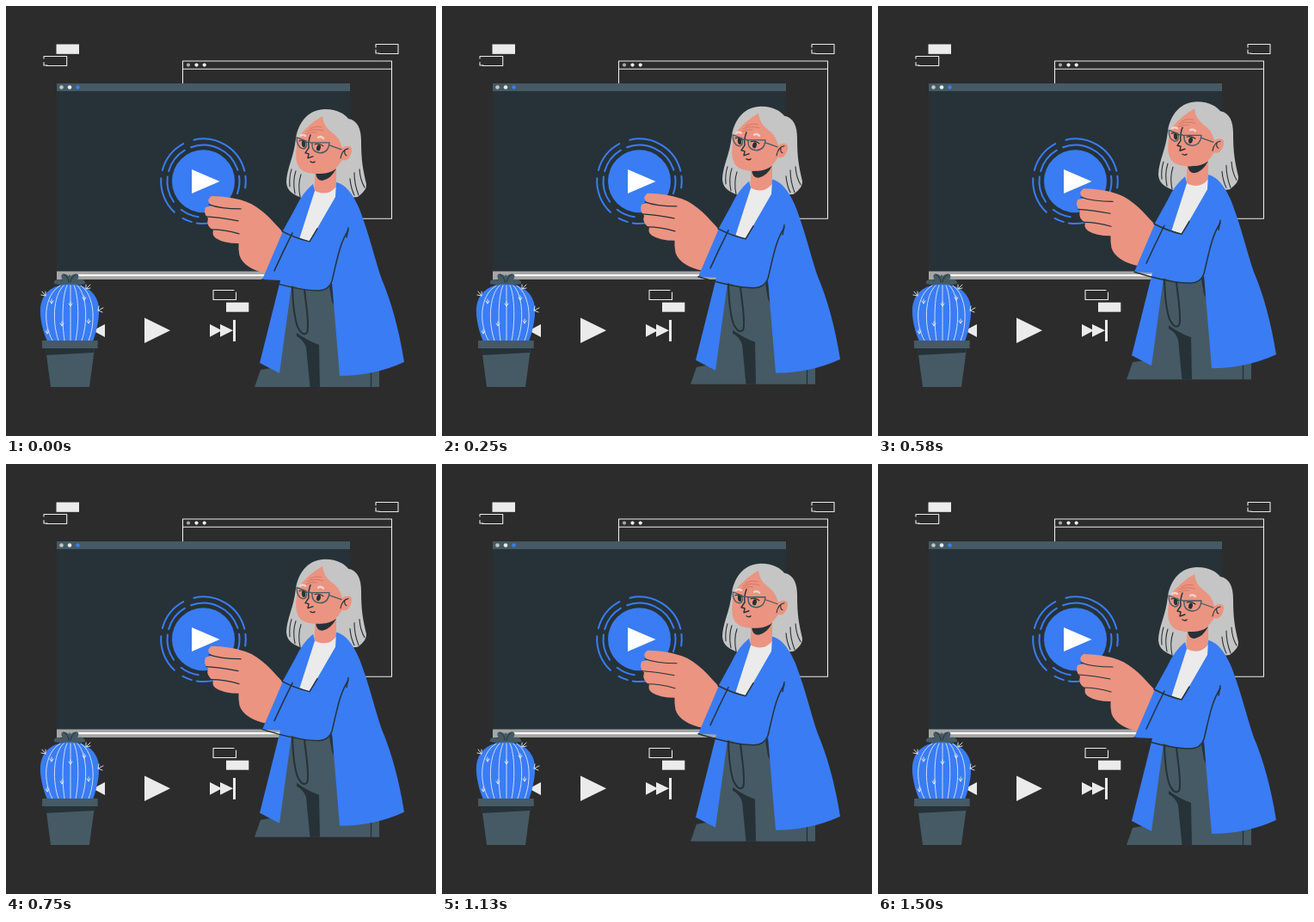
An HTML page with a canvas for the animation above (1540 ms loop, 500x500 px).

```html
<!DOCTYPE html>
<html lang="en">
<head>
<meta charset="utf-8">
<title>Video lesson</title>
<style>
  html, body { margin: 0; width: 100%; height: 100%; overflow: hidden; background: #2c2c2c; }
  canvas { display: block; width: 100vw; height: 100vh; }
</style>
</head>
<body>
<canvas id="stage" width="500" height="500"></canvas>
<script>
const ctx = document.getElementById('stage').getContext('2d');

const BG = '#2c2c2c', INK = '#263238', SLATE = '#455a64', BLUE = '#3a7cf3';
const SKIN = '#eb9481', HAIR = '#c5c5c5', WHITE = '#ebebeb', GRAY = '#a6a6a6';

const LOOP = 1540, STEPS = 37, PEAK = 17.2, RISE = 9.4;

function fill(color, path) {
  ctx.fillStyle = color;
  ctx.fill(new Path2D(path));
}

function line(color, width, path) {
  ctx.strokeStyle = color;
  ctx.lineWidth = width;
  ctx.stroke(new Path2D(path));
}

function rect(color, x, y, w, h) {
  ctx.fillStyle = color;
  ctx.fillRect(x, y, w, h);
}

function oval(color, x, y, rx, ry = rx, turn = 0) {
  ctx.fillStyle = color;
  ctx.beginPath();
  ctx.ellipse(x, y, rx, ry, turn, 0, Math.PI * 2);
  ctx.fill();
}

function arcs(x, y, r, spans) {
  ctx.strokeStyle = BLUE;
  ctx.lineWidth = 2;
  for (const [from, to] of spans) {
    ctx.beginPath();
    ctx.arc(x, y, r, from * Math.PI / 180, to * Math.PI / 180);
    ctx.stroke();
  }
}

function dots(y, r, list) {
  for (const [x, color] of list) oval(color, x, y, r);
}

function drawWindows() {
  rect(WHITE, 58.5, 44.5, 26.5, 11.3);
  line(WHITE, 1.1, 'M44 61V58.5H70.7V69.5H47M44 65.5V69H48');
  line(WHITE, 1.1, 'M430 48V44.5H456V55.5H434M430 51V55H434');

  line(WHITE, 1.1, 'M205.5 64H448.5V247.3H205.5ZM205.5 73.2H448.5');
  dots(68.6, 2.1, [[212, GRAY], [221.5, WHITE], [230.7, WHITE]]);

  rect(INK, 59, 90, 341, 228);
  rect(SLATE, 59, 90, 341, 9);
  dots(94.5, 2.3, [[64.5, '#c4c4c4'], [74, WHITE], [83.5, BLUE]]);
  rect(GRAY, 59, 308.5, 341, 9.5);
  rect('#fafafa', 84, 312, 316, 2.2);
}

function drawControls() {
  oval(BLUE, 229.5, 203.7, 36.5);
  arcs(229.5, 203.7, 42, [[-110, -18], [-8, 20], [145, 187], [196, 239], [98, 128]]);
  arcs(229.5, 203.7, 49.3, [[-103, -14], [-7, 9], [133, 184], [195, 242], [106, 119], [74, 99]]);
  fill('#fff', 'M216 190L248.5 204L216 218Z');

  fill(WHITE, 'M115 370V385L101 377.5Z');
  fill(WHITE, 'M161 362.5L191 377.3L161 392Z');
  fill(WHITE, 'M237 370L251 377.3L237 384.7ZM249 370L264 377.3L249 384.7Z');
  rect(WHITE, 264, 365, 3, 25);

  line(WHITE, 1.1, 'M267.5 333V341.5H241V330.5H265');
  rect(WHITE, 256, 344.7, 26.3, 11);
}

function drawCactus() {
  fill(SLATE, 'M56 323C55 318 60 317 66 319C62 312 66 309 73 314Q74 310 75 314C82 309 87 312 83 318C88 317 93 319 92 323Q74 327 56 323Z');
  line(INK, 1, 'M67 312Q73 315 73 321M81 312Q76 315 75 321');
  fill(BLUE, 'M48 390C41 374 38 355 41 345C45 331 57 323.5 74 323.5C91 323.5 103 331 107 345C110 355 107 374 101 390Z');

  for (const [x, mid, low] of [[63, 43, 54], [67, 54, 61], [71, 65, 68], [75, 75, 75], [79, 85, 81], [83, 95, 88], [87, 104, 96]])
    line('#dce9fb', .9, `M${x} 325C${mid} 337 ${mid} 370 ${low} 389`);
  for (const [x, y] of [[53, 345], [65, 371], [75, 348], [91, 341], [96, 368], [48, 380]])
    line(WHITE, .9, `M${x - 2} ${y - 2}L${x} ${y + 1}L${x + 2} ${y - 2}M${x} ${y - 4}V${y + 1}`);
  line(WHITE, .9, 'M42 332L46 337M41 336L46 337V332M98 324L93 329M93 324V329L98 328M113 351L107 354M108 349L107 354L112 356');

  rect(SLATE, 42, 389, 64.7, 9);
  fill(SLATE, 'M46 398H103L97 443H52Z');
  fill(INK, 'M46 398H103L102.3 403L47 406Z');
}

function drawLegs() {
  fill(SLATE, 'M329 315H386L392 420H434V443H289L296 423L316 420Z');
  fill(INK, 'M338 380Q350 389 364 394L365 443H353.5L349 397Q346 388 338 384Z');
  fill(INK, 'M376 326L382 318L385 385Q384 350 379 344Z');
  line(INK, 2, 'M333 327Q334 359 339 373Q345 385 350 380Q352 375 350 355L347 330');
  line(INK, 1.3, 'M424.5 424V443');
}

function drawHair() {
  fill(HAIR, 'M371 120C386 120 394 126 398 131C409 133 413 143 413 157C413 180 415 190 419 207Q420 214 409 222L390 224H346C334 219 327 216 326 205C326 190 335 175 337 154C340 134 353 120 371 120Z');
  line(INK, 1.1, 'M337 192Q333 204 336 218M343 196Q339 208 342 222M332 190Q329 199 330 210M405 194Q405 207 410 220M411 190Q412 203 417 211M400 201Q401 212 405 220');
}

function drawHead() {
  fill(SKIN, 'M360 188H384V214Q374 222 358 218Z');
  fill(INK, 'M360 194Q374 197 384 189Q378 201 368 203Q361 203 360 194Z');
  fill(SKIN, 'M368 128C358 134 343 145 339 156C336 174 336 186 346 192C359 198 377 195 386 186L391 179C397 182 402 174 402 167C402 162 396 162 391 165Q388 153 379 147Q369 140 368 128Z');
  line(INK, 1.1, 'M398 166Q391 167 389 177M394 168Q393 173 396 174');
  line('#cf705f', .8, 'M350 146Q358 142 369 145M353 143Q360 139 367 141M349 149Q355 146 361 147');

  line('#f1d3ca', 2.4, 'M342 151Q345 149 348 151M363 153Q366 151 369 154');
  oval(INK, 346, 160.5, 2.1, 3.8, -.15);
  oval(INK, 363.5, 165, 2.4, 3.6, .2);
  line(INK, 1.1, 'M341 157Q345 155 349 159M359 161Q364 159 369 163');
  line(INK, 1.4, 'M354 150Q351 158 352 165L348 171L352 172L351 177L357 175M354 181Q357 183 359 181');
  line(SLATE, 1.3, 'M338 153L349 157Q351 166 345 166Q338 164 338 153ZM356 159L376 159Q375 171 365 171Q355 170 356 159ZM349 159Q353 157 356 160M376 162L390 167');
}

function drawCoat() {
  fill(WHITE, 'M357 214Q374 223 384 210L386 224L354 278L337 272Z');
  fill(BLUE, 'M357 207Q344 218 337 234L321 263L341 271L359 215Z');
  fill(BLUE, 'M384 205C396 207 408 224 416 250C425 276 430 298 437 318Q454 358 463 414Q428 430 388 430L379 322Q374 332 363 331Q347 331 332 325L318 427L295 415L319 319L298 318L322 262L353 274L383 222Z');
  line(INK, 1.5, 'M298 318Q340 331 363 331Q375 331 379 320C385 295 388 276 398 261');
  line(INK, 1.5, 'M321 262Q336 270 353 274L362 259M333 264Q322 286 312 308M396 269L398 258');
}

function drawHand() {
  fill(SKIN, 'M239 221Q261 221 279 227.5C297 234 310 250 322 263L303 311C288 308 275 301 271.5 290Q270 282 270.5 276Q253 276 244 270Q239 266 241 261Q232 255 235 247Q229 241 232 234L240 232Q231 227 239 221Z');
  line(INK, 1.2, 'M236 231Q249 236 273 236M233 245Q250 246 270 250M239 260Q254 260 271 265');
}

// Smooth rise and fall, held on evenly spaced steps.
function lift(time) {
  const step = Math.floor((time % LOOP) * STEPS / LOOP + .2);
  return RISE * (1 + Math.cos(2 * Math.PI * (step - PEAK) / STEPS)) / 2;
}

function draw(time) {
  ctx.lineCap = ctx.lineJoin = 'round';
  rect(BG, 0, 0, 500, 500);
  drawWindows();
  drawControls();
  drawCactus();

  ctx.save();
  ctx.translate(0, -lift(time));
  drawLegs();
  drawHair();
  drawHead();
  drawHand();
  drawCoat();
  ctx.restore();
}

let start;
function tick(now) {
  start ??= now;
  draw(now - start);
  requestAnimationFrame(tick);
}
draw(0);
requestAnimationFrame(tick);
</script>
</body>
</html>
```
